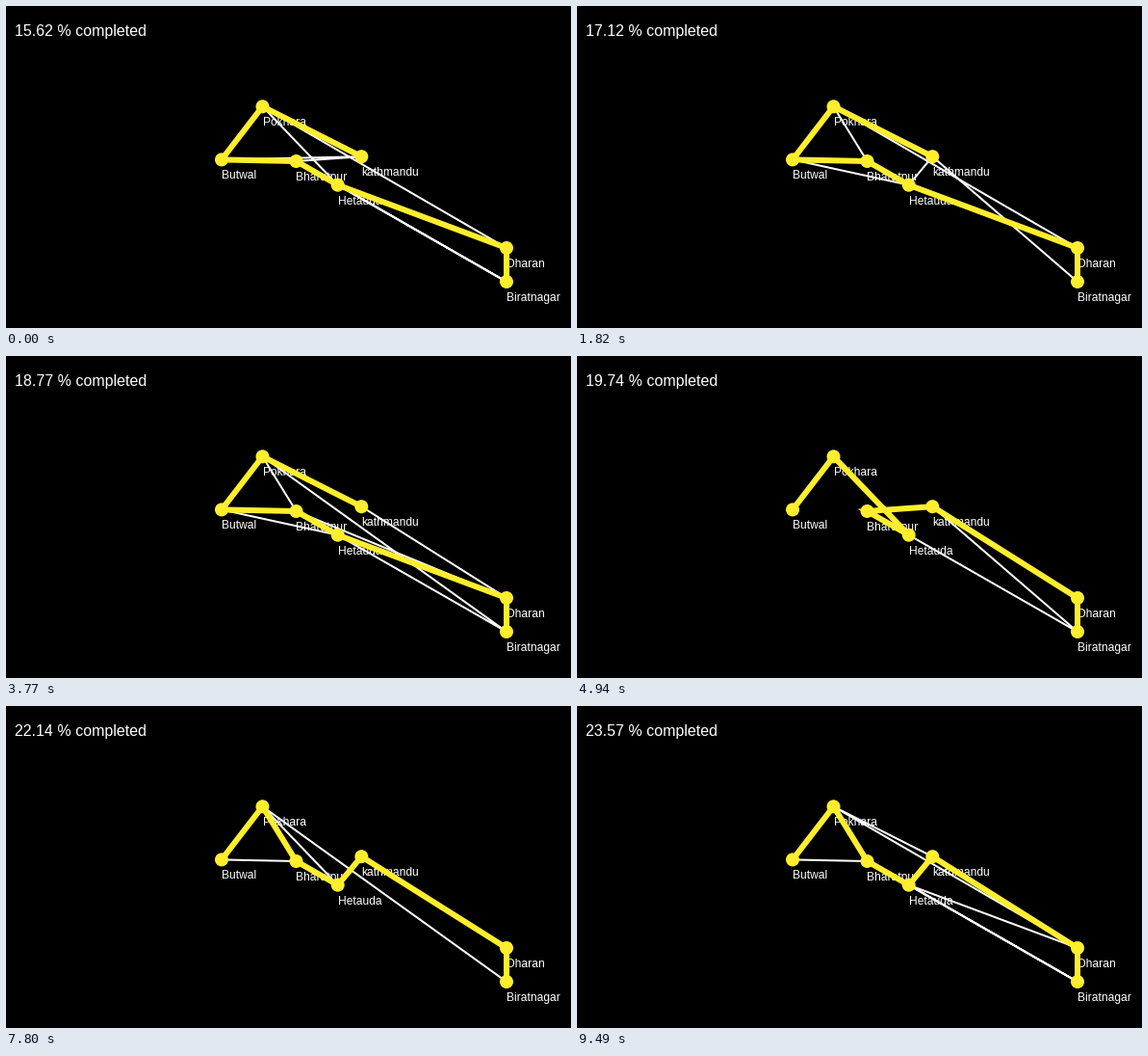
These frames come from a looping animation (587 by 334 pixels, 9.62 s). A matplotlib script:

```python
from itertools import islice, permutations
from math import dist

import matplotlib.pyplot as plt
from matplotlib.animation import FuncAnimation
from matplotlib.patches import Circle

WIDTH, HEIGHT, DPI = 587, 334, 100
PX = 72 / DPI
YELLOW = "#ffee2d"
FONT = "Liberation Sans"

FRAMES, INTERVAL = 74, 130
TOTAL = 5040          # 7! possible routes
FIRST_COUNT = 787
ROUTES_PER_FRAME = 5.4935

CITIES = [
    ("kathmandu", 369.3, 156.2),
    ("Butwal", 224.0, 159.4),
    ("Hetauda", 344.7, 185.7),
    ("Pokhara", 266.5, 104.3),
    ("Bharatpur", 301.5, 161.0),
    ("Dharan", 520.0, 251.0),
    ("Biratnagar", 520.0, 286.0),
]
POINTS = [city[1:] for city in CITIES]


def route_count(frame):
    return FIRST_COUNT + int(ROUTES_PER_FRAME * frame)


def length(route):
    return sum(dist(POINTS[a], POINTS[b]) for a, b in zip(route, route[1:]))


def best_so_far(routes):
    best, record, result = None, float("inf"), []
    for route in routes:
        d = length(route)
        if d < record - 1e-9:
            best, record = route, d
        result.append(best)
    return result


routes = list(islice(permutations(range(len(CITIES))), route_count(FRAMES)))
bests = best_so_far(routes)

fig = plt.figure(figsize=(WIDTH / DPI, HEIGHT / DPI), dpi=DPI, facecolor="black")
ax = fig.add_axes([0, 0, 1, 1])
ax.set(xlim=(0, WIDTH), ylim=(HEIGHT, 0))
ax.axis("off")


def label(x, y, text, size):
    return ax.text(x, y, text, color="white", family=FONT, size=size * PX,
                   va="baseline", zorder=1)


def path_line(color, width, zorder):
    return ax.plot([], [], color=color, lw=width * PX, zorder=zorder,
                   solid_joinstyle="miter", solid_capstyle="round")[0]


for name, x, y in CITIES:
    label(x, y + 20, name, 12)
    ax.add_patch(Circle((x, y), 7, color=YELLOW, lw=0, zorder=4))

status = label(9, 31, "", 16)
current_line = path_line("white", 2, 2)
best_line = path_line(YELLOW, 6, 3)


def update(frame):
    count = route_count(frame)
    current_line.set_data(*zip(*(POINTS[i] for i in routes[count - 1])))
    best_line.set_data(*zip(*(POINTS[i] for i in bests[count - 1])))
    status.set_text(f"{100 * count / TOTAL:.2f} % completed")
    return current_line, best_line, status


animation = FuncAnimation(fig, update, frames=FRAMES, interval=INTERVAL,
                          repeat=True, repeat_delay=0)
plt.show()
```
